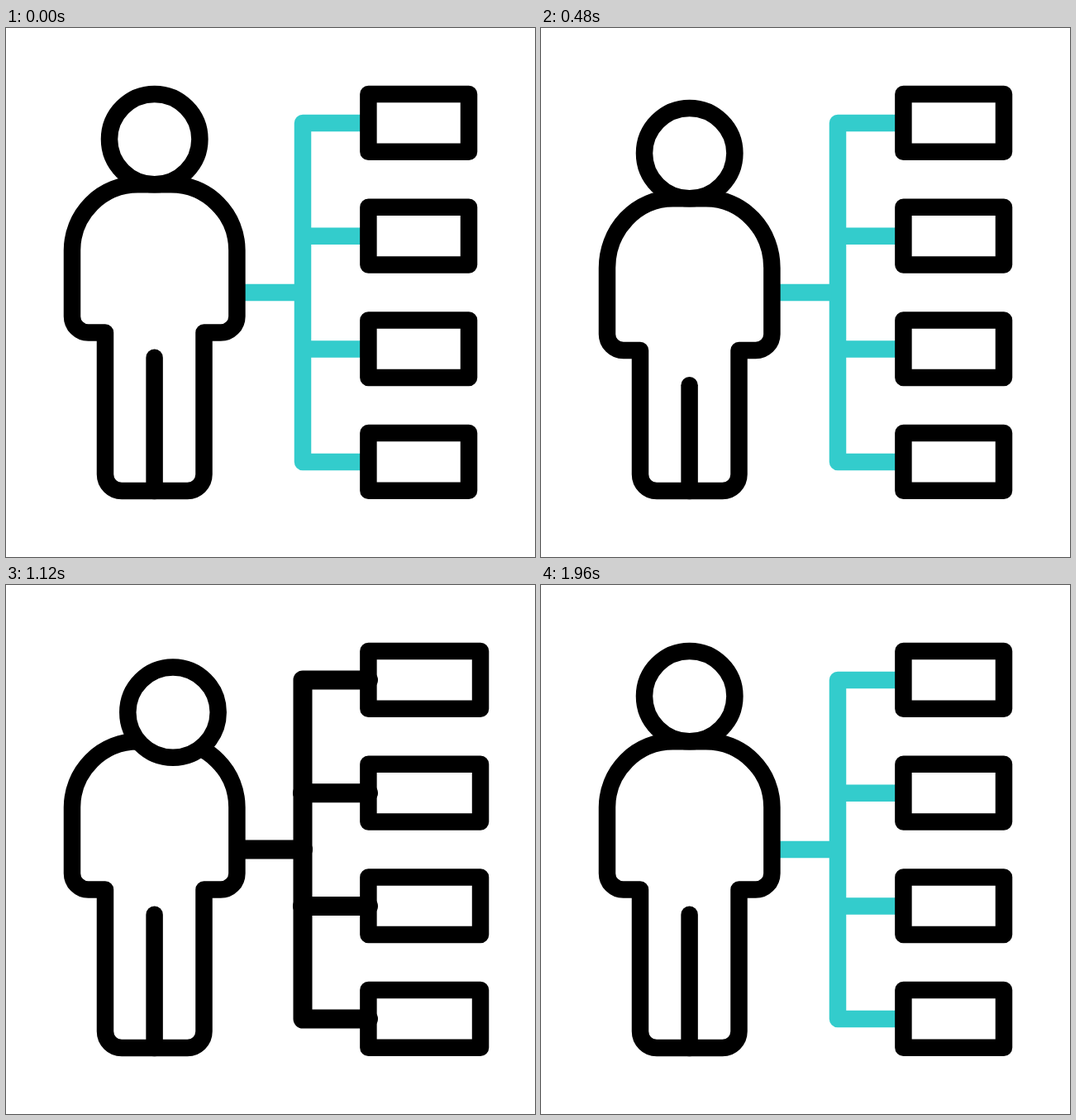
These frames come from a looping animation (640x640 px, 2 s). An HTML page:

```html
<!DOCTYPE html>
<html lang="en">
<head>
<meta charset="utf-8">
<title>Person with branching boxes</title>
<style>
  html, body { margin: 0; width: 100%; height: 100%; overflow: hidden; background: #fff; }
  svg { display: block; width: 100%; height: 100%; }
  path, circle { fill: none; stroke: #000; stroke-width: 20.5; stroke-linecap: round; stroke-linejoin: round; }
  .base path { stroke: #3cc; stroke-linecap: butt; }
  .flow path { stroke-width: 23; }
  .person path, .person circle { fill: #fff; }
</style>
</head>
<body>
<svg viewBox="0 0 640 640">
  <g class="base">
    <path d="M438 115H359V525H438M359 251.7H438M359 388.4H438M240 320H359"/>
  </g>
  <g class="flow" id="flow"></g>
  <g class="person">
    <path id="body"/>
    <path id="legs"/>
    <circle id="head" r="54.7"/>
  </g>
  <path id="boxes"/>
</svg>
<script>
const LOOP = 2000;
const $ = id => document.getElementById(id);

function ease(t, from, to) {
  const p = Math.min(1, Math.max(0, (t - from) / (to - from)));
  return p * p * (3 - 2 * p);
}

// Goes 0 to 1 between a and b, then back to 0 between c and d.
const pulse = (t, [a, b, c, d]) => ease(t, a, b) - ease(t, c, d);

// Vertical offsets of the jump: head, shoulder curve, hip, crotch, feet.
const REST = [0, 0, 0, 0, 0];
const CROUCH = [17, 21.3, 21.5, 33.5, 0];
const APEX = [-65.8, -78.4, -79, -83.7, -81.5];
const JUMP = [[80, REST], [200, CROUCH], [350, APEX], [480, CROUCH], [640, REST]];

function jumpPose(t) {
  let pose = REST;
  for (let i = 1; i < JUMP.length; i++) {
    const [from, a] = JUMP[i - 1], [to, b] = JUMP[i];
    if (t >= from) {
      const k = ease(t, from, to);
      pose = a.map((v, j) => v + (b[j] - v) * k);
    }
  }
  return pose;
}

// Black lines that run along the teal tree: path, length, timing.
const MID = [800, 1040, 1415, 1670];
const SPINE = [720, 1040, 1415, 1760];
const STEM = [640, 760, 1760, 1960];
const lines = [
  ["M268 320H359.5", 91.5, STEM],
  ["M359 320V115H438.5", 284.5, SPINE],
  ["M359 320V525H438.5", 284.5, SPINE],
  ["M358.5 251.7H438.5", 80, MID],
  ["M358.5 388.4H438.5", 80, MID]
].map(([d, length, times]) => {
  const el = document.createElementNS("http://www.w3.org/2000/svg", "path");
  el.setAttribute("d", d);
  $("flow").append(el);
  return { el, length, times };
});

const HEAD_SHIFT = [640, 860, 1610, 1850];
const BOX_STRETCH = [1000, 1160, 1160, 1360];
const BOX_TOPS = [80, 216.7, 353.4, 490.1];

function drawPerson(t) {
  const [top, curve, hip, crotch, feet] = jumpPose(t);
  const shift = pulse(t, HEAD_SHIFT);
  $("head").setAttribute("cx", 179.7 + 22.3 * shift);
  $("head").setAttribute("cy", 134.6 + top + 19.5 * shift);

  const y0 = 189.3 + top, y1 = 269 + curve, y2 = 368.6 + hip, y3 = 560 + feet;
  const ry = y1 - y0;
  $("body").setAttribute("d", `M80 ${y1}A79.7 ${ry} 0 0 1 159.7 ${y0}H199.7
    A79.7 ${ry} 0 0 1 279.4 ${y1}V${y2 - 19.7}a19.7 19.7 0 0 1 -19.7 19.7H239.5
    V${y3 - 20}a20 20 0 0 1 -20 20H140a20 20 0 0 1 -20 -20
    V${y2}H99.7a19.7 19.7 0 0 1 -19.7 -19.7Z`);
  $("legs").setAttribute("d", `M179.6 ${398.8 + crotch}V${y3}`);
}

function drawLines(t) {
  for (const { el, length, times } of lines) {
    const shown = length * pulse(t, times);
    el.style.display = shown > 0.01 ? "" : "none";
    el.setAttribute("stroke-dasharray", `${shown} 999`);
  }
}

function drawBoxes(t) {
  const w = 121.6 + 16.5 * pulse(t, BOX_STRETCH);
  $("boxes").setAttribute("d", BOX_TOPS.map(y => `M438.4 ${y}h${w}v69.7h${-w}z`).join(""));
}

const start = performance.now();

function frame(now) {
  const t = Math.max(0, now - start) % LOOP;
  drawPerson(t);
  drawLines(t);
  drawBoxes(t);
  requestAnimationFrame(frame);
}
frame(start);
</script>
</body>
</html>
```
